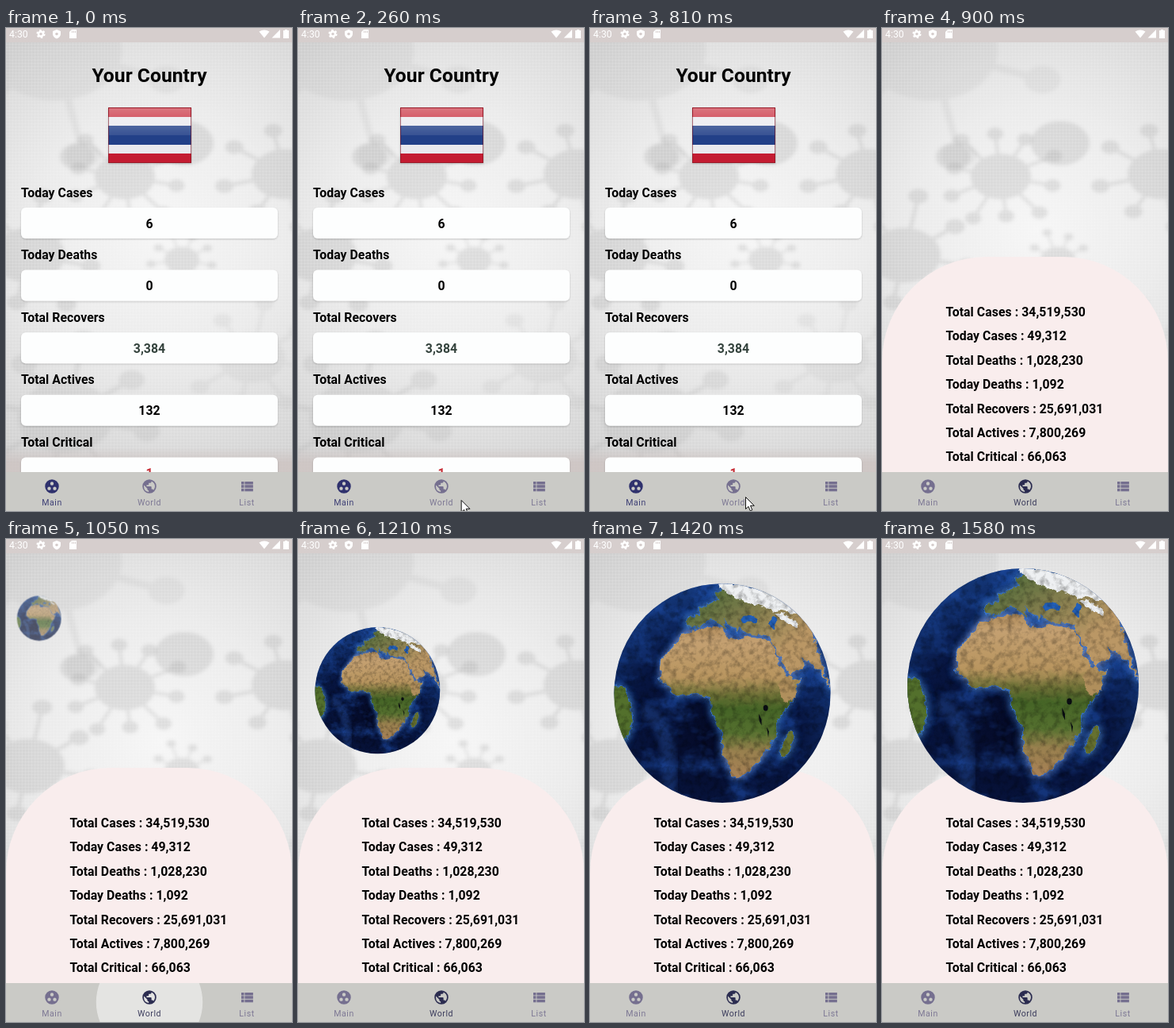
These frames come from a looping animation (361 px wide and 608 px high, 3200 ms). An HTML page:

```html
<!DOCTYPE html>
<html lang="en">
<head>
<meta charset="utf-8">
<title>Case tracker</title>
<style>
  html, body { margin: 0; width: 100%; height: 100%; overflow: hidden; background: #e6e6e6; }
  svg { display: block; width: 100vw; height: 100vh; }
  text { font-family: Roboto, Arial, sans-serif; font-weight: 600; font-size: 15.8px; letter-spacing: .05px; }
  .title { font-size: 24.6px; }
  .mid { text-anchor: middle; }
  .tab text { font-weight: 400; font-size: 10.6px; letter-spacing: .55px; text-anchor: middle; opacity: .9; }
  .clock { font-weight: 400; font-size: 12.3px; letter-spacing: 0; }
</style>
</head>
<body>
<svg viewBox="0 0 361 608" preserveAspectRatio="none">
  <defs>
    <radialGradient id="paper" gradientUnits="userSpaceOnUse" cx="195" cy="255" r="350">
      <stop offset="0" stop-color="#f6f6f6"/><stop offset=".45" stop-color="#ebebeb"/>
      <stop offset="1" stop-color="#cfcfcf"/>
    </radialGradient>
    <pattern id="dots" width="4" height="4" patternUnits="userSpaceOnUse">
      <path d="M0 .5H4M.5 0V4" stroke="#fff" stroke-opacity=".12"/>
    </pattern>
    <linearGradient id="floor" x2="0" y2="1">
      <stop offset="0" stop-color="#cdc3c1" stop-opacity="0"/><stop offset=".6" stop-color="#cdc3c1" stop-opacity=".8"/>
    </linearGradient>
    <linearGradient id="gloss" x2="0" y2="1">
      <stop offset="0" stop-color="#fff" stop-opacity=".38"/><stop offset="1" stop-color="#fff" stop-opacity=".1"/>
    </linearGradient>
    <linearGradient id="africa" gradientUnits="userSpaceOnUse" x1="0" y1="95" x2="0" y2="299">
      <stop offset="0" stop-color="#b08c5c"/><stop offset=".1" stop-color="#c4a071"/>
      <stop offset=".34" stop-color="#b8955f"/><stop offset=".45" stop-color="#6d7036"/>
      <stop offset=".54" stop-color="#456426"/><stop offset=".7" stop-color="#55702f"/>
      <stop offset=".82" stop-color="#98804e"/><stop offset="1" stop-color="#a88156"/>
    </linearGradient>
    <linearGradient id="asia" gradientUnits="userSpaceOnUse" x1="150" y1="50" x2="220" y2="150">
      <stop offset="0" stop-color="#55703c"/><stop offset=".45" stop-color="#7d7b4b"/>
      <stop offset="1" stop-color="#ba9765"/>
    </linearGradient>
    <radialGradient id="sea" gradientUnits="userSpaceOnUse" cx="165" cy="240" r="215">
      <stop offset="0" stop-color="#050a26"/><stop offset=".55" stop-color="#071540"/>
      <stop offset="1" stop-color="#173f86"/>
    </radialGradient>
    <clipPath id="disc"><ellipse cx="178" cy="184.500" rx="146" ry="147.500"/></clipPath>
    <filter id="soft"><feGaussianBlur stdDeviation="2"/></filter>
    <filter id="haze" x="-30%" y="-30%" width="160%" height="160%"><feGaussianBlur stdDeviation="4"/></filter>
    <filter id="drop" x="-10%" y="-20%" width="120%" height="150%">
      <feDropShadow dx="0" dy="1" stdDeviation="1" flood-opacity=".2"/>
    </filter>
    <filter id="rough" filterUnits="userSpaceOnUse" x="20" y="25" width="316" height="320" color-interpolation-filters="sRGB">
      <feTurbulence type="fractalNoise" baseFrequency=".1" numOctaves="3" seed="4"/>
      <feDisplacementMap in="SourceGraphic" scale="10" xChannelSelector="R" yChannelSelector="G"/>
    </filter>
    <filter id="grain" filterUnits="userSpaceOnUse" x="20" y="25" width="316" height="320">
      <feTurbulence type="fractalNoise" baseFrequency=".12" numOctaves="4" seed="9"/>
      <feColorMatrix values="0 0 0 0 0  0 0 0 0 0  0 0 0 0 0  2 0 0 0 -.85"/>
    </filter>
    <filter id="swell" filterUnits="userSpaceOnUse" x="20" y="25" width="316" height="320" color-interpolation-filters="sRGB">
      <feTurbulence type="fractalNoise" baseFrequency=".022 .034" numOctaves="4" seed="3"/>
      <feColorMatrix values="0 0 0 0 .12  0 0 0 0 .3  0 0 0 0 .65  3 0 0 0 -1.35"/>
    </filter>
    <g id="land">
      <path fill="url(#africa)" d="M125 103L150 97 178 96 184 108 200 114 207 107 243 114 258 150 270 167 284 164 274 190 252 222 252 240 233 270 206 297 193 298 178 265 178 236 164 212 163 190 136 184 118 188 94 166 97 140Z"/>
      <path fill="url(#asia)" d="M130 82L147 80 146 71 174 58 168 50 185 40 240 46 292 84 326 185 311 153 282 136 290 146 270 161 246 118 242 107 207 103 200 93 198 102 180 84 184 100 166 84 140 97 130 96Z"/>
      <ellipse cx="266" cy="254" rx="6" ry="18" transform="rotate(22 266 254)" fill="#66712f"/>
      <ellipse cx="36" cy="215" rx="20" ry="40" fill="#53702c"/>
    </g>
  </defs>

  <rect width="361" height="608" fill="url(#paper)"/>
  <g id="germs" filter="url(#soft)" fill="#aaa" stroke="#aaa"></g>
  <rect width="361" height="608" fill="url(#dots)"/>

  <g id="main">
    <rect y="528" width="361" height="32" fill="url(#floor)"/>
    <text class="title mid" x="181" y="68">Your Country</text>
    <g filter="url(#drop)">
      <rect x="129" y="100" width="105" height="70" fill="#c41f30"/>
      <rect x="129" y="112" width="105" height="46" fill="#e9e9ee"/>
      <rect x="129" y="123" width="105" height="24" fill="#213f88"/>
      <rect x="130" y="101" width="103" height="34" fill="url(#gloss)"/>
      <rect x="129.500" y="100.500" width="104" height="69" fill="none" stroke="#7d1826" stroke-opacity=".6"/>
    </g>
  </g>

  <g id="world">
    <path fill="#f9eded" d="M0 608V420A132 132 0 0 1 132 288H229A132 132 0 0 1 361 420V608Z"/>
    <g id="globe">
      <g clip-path="url(#disc)">
        <rect x="30" y="35" width="296" height="300" fill="url(#sea)"/>
        <path d="M70 205Q115 225 105 330" fill="none" stroke="#21478f" stroke-width="20" opacity=".5" filter="url(#haze)"/>
        <rect x="30" y="35" width="296" height="300" filter="url(#swell)" opacity=".6"/>
        <use href="#land" stroke="#2d69c4" stroke-width="9" stroke-opacity=".65" filter="url(#haze)"/>
        <g filter="url(#rough)">
          <use href="#land" stroke="#3671cc" stroke-width="2"/>
          <use href="#land"/>
          <ellipse cx="266" cy="178" rx="12" ry="17" fill="#b08f5c"/>
          <ellipse cx="214" cy="85" rx="11" ry="5" fill="#2360b9"/>
          <ellipse cx="246" cy="90" rx="4" ry="9" fill="#2360b9"/>
          <g fill="#eef0f2">
            <ellipse cx="228" cy="56" rx="58" ry="11" transform="rotate(17 228 56)"/>
            <ellipse cx="266" cy="86" rx="18" ry="4" transform="rotate(30 266 86)"/>
          </g>
        </g>
        <g fill="#0a0d12">
          <ellipse cx="236.500" cy="204.500" rx="3.200" ry="4"/>
          <path d="M227 212L231 220V228L228 222ZM238 230L241 236 240 244Z"/>
        </g>
        <rect x="30" y="35" width="296" height="300" filter="url(#grain)" opacity=".35"/>
      </g>
    </g>
  </g>

  <rect width="361" height="18" fill="#d6cecd"/>
  <g fill="#fff">
    <text class="clock" x="4" y="12">4:30</text>
    <circle cx="44" cy="7.500" r="3" fill="none" stroke="#fff" stroke-width="2.500"/>
    <circle cx="44" cy="7.500" r="4.700" fill="none" stroke="#fff" stroke-width="1.800" stroke-dasharray="2.460"/>
    <path d="M64 2L69 4V8Q68.500 11.500 64 13.500 59.500 11.500 59 8V4Z"/>
    <circle cx="64" cy="7.500" r="1.800" fill="#d6cecd"/>
    <path d="M83 2H89V13H80V5Z"/>
    <path stroke="#d6cecd" d="M83.500 3.500V6M85.500 3.500V6M87.500 3.500V6"/>
    <path d="M319.500 4.500Q326 .5 332.500 4.500L326 12.500ZM346 2V12.500H335.500Z"/>
    <path d="M350 3H352V2H355V3H357V13H350Z"/>
  </g>

  <rect y="559" width="361" height="49" fill="#cacac6"/>
  <svg y="559" width="361" height="49"><circle id="ripple" cx="181" cy="24" fill="#fff"/></svg>
  <g id="tabs"></g>
  <path id="cursor" fill="#fff" stroke="#111" d="M.5 .5V15.500L4 12.300 6.300 17.800 8.800 16.700 6.500 11.300H11.300Z"/>
</svg>
<script>
const LOOP = 3200, CURSOR_IN = 110, SWITCH = 890, GROW_START = 855, GROW_TIME = 676;
const byId = id => document.getElementById(id);
const clamp = v => Math.min(1, Math.max(0, v));

function add(parent, tag, attrs, text = '') {
  const node = document.createElementNS('http://www.w3.org/2000/svg', tag);
  for (const key in attrs) node.setAttribute(key, attrs[key]);
  node.textContent = text;
  parent.append(node);
  return node;
}

// Soft particle: a body with knobbed spikes at regular angles.
function germ(x, y, size, spikes, turn = .2, opacity = .3) {
  const g = add(byId('germs'), 'g', { opacity });
  const blob = (cx, cy, r) => add(g, 'ellipse', { cx, cy, rx: r, ry: r * .75, stroke: 'none' });
  blob(x, y, size);
  for (let i = 0; i < spikes; i++) {
    const angle = turn + i * 2 * Math.PI / spikes;
    const reach = size * (1.75 + .2 * Math.sin(i * 2.3));
    const kx = x + reach * Math.cos(angle), ky = y + reach * .85 * Math.sin(angle);
    add(g, 'line', { x1: x, y1: y, x2: kx, y2: ky, 'stroke-width': size * .1 });
    blob(kx, ky, size * .27);
  }
}
germ(150, 187, 38, 10);
germ(62, 28, 84, 6, .3, .17);
germ(225, 145, 37, 0);
germ(90, 162, 22, 0);
germ(28, 286, 46, 8);
germ(352, 184, 42, 8, .56);
germ(222, 292, 22, 9);
germ(75, 490, 60, 8, .2, .24);
germ(310, 415, 42, 8, .2, .15);

[['Today Cases', '6'], ['Today Deaths', '0'], ['Total Recovers', '3,384', '#35443e'],
 ['Total Actives', '132'], ['Total Critical', '1', '#c8323a']].forEach(([label, value, fill = '#000'], i) => {
  const y = 212.5 + i * 78.6;
  add(byId('main'), 'text', { x: 19, y }, label);
  add(byId('main'), 'rect', { x: 19, y: y + 13.5, width: 324, height: 39, rx: 6, fill: '#fdfefe', filter: 'url(#drop)' });
  add(byId('main'), 'text', { x: 181, y: y + 39, class: 'mid', fill }, value);
});

['Total Cases : 34,519,530', 'Today Cases : 49,312', 'Total Deaths : 1,028,230', 'Today Deaths : 1,092',
 'Total Recovers : 25,691,031', 'Total Actives : 7,800,269', 'Total Critical : 66,063'].forEach((line, i) =>
  add(byId('world'), 'text', { x: 80.5, y: 363 + i * 30.4 }, line));

// Icons live in a 24-unit box; later subpaths are cut out.
const circle = (x, y, r) => `M${x - r} ${y}a${r} ${r} 0 1 0 ${2 * r} 0a${r} ${r} 0 1 0 ${-2 * r} 0Z`;
const icons = {
  Main: circle(12, 12, 10) + circle(12, 8, 2.5) + circle(8, 15, 2.5) + circle(16, 15, 2.5),
  World: circle(12, 12, 10) + 'M4.2 10.2L9 15V16Q9 18 11 18V20Q4 19 4 12Z' +
    'M15 4.6Q20 7 20 12 20 15 17.900 17.400 17.500 16 16 16H15V13Q15 12 14 12H8V10H10Q11 10 11 9V7H13Q15 7 15 5Z',
  List: [5, 10, 15].map(y => `M4 ${y}h4v4H4ZM9 ${y}h12v4H9Z`).join('')
};
Object.entries(icons).forEach(([label, d], i) => {
  const x = 58 + i * 123, tab = add(byId('tabs'), 'g', { class: 'tab' });
  add(tab, 'path', { d, 'fill-rule': 'evenodd', transform: `translate(${x - 10.5} 566.5) scale(.875)` });
  add(tab, 'text', { x, y: 601 }, label);
});

// The screen refreshes every 80 ms; one refresh comes early at 1340.
function held(t) {
  const base = t < 1340 ? 10 : 60;
  return base + Math.floor((t - base) / 80) * 80;
}

// time, x, y
const cursorPath = [[170, 218, 603], [410, 181, 576], [570, 198, 592], [810, 196, 590]];
function cursorAt(t) {
  const i = Math.max(1, cursorPath.findIndex(key => key[0] >= t));
  const [t0, x0, y0] = cursorPath[i - 1], [t1, x1, y1] = cursorPath[i];
  const k = clamp((t - t0) / (t1 - t0));
  return [x0 + (x1 - x0) * k, y0 + (y1 - y0) * k];
}

const set = (id, attrs) => { for (const key in attrs) byId(id).setAttribute(key, attrs[key]); };
const show = (id, on) => set(id, { visibility: on ? 'visible' : 'hidden' });

function render(time) {
  const t = held(time), onWorld = t >= SWITCH;
  show('main', !onWorld);
  show('world', onWorld);
  show('cursor', time >= CURSOR_IN && !onWorld);
  set('cursor', { transform: `translate(${cursorAt(t)})` });

  // The globe swings along an arc while it grows.
  const u = clamp((t - GROW_START) / GROW_TIME), p = (1 - Math.cos(Math.PI * u)) / 2;
  const x = 9.5 + 168.5 * p, y = 14.5 + 510 * p - 340 * p * p;
  set('globe', { transform: `translate(${x} ${y}) scale(${p}) translate(-178 -184.5)`, opacity: clamp(u * 2.35) });

  set('ripple', { r: Math.max(0, t - SWITCH) * .42, opacity: onWorld ? .5 * clamp((1210 - t) / 160) : 0 });

  [...byId('tabs').children].forEach((tab, i) => {
    const active = i === Number(onWorld);
    tab.setAttribute('fill', active ? (onWorld ? '#2b2c50' : '#2f316d') : '#756f8f');
  });
}

const start = performance.now();
function tick() {
  render((performance.now() - start) % LOOP);
  requestAnimationFrame(tick);
}
tick();
</script>
</body>
</html>
```
